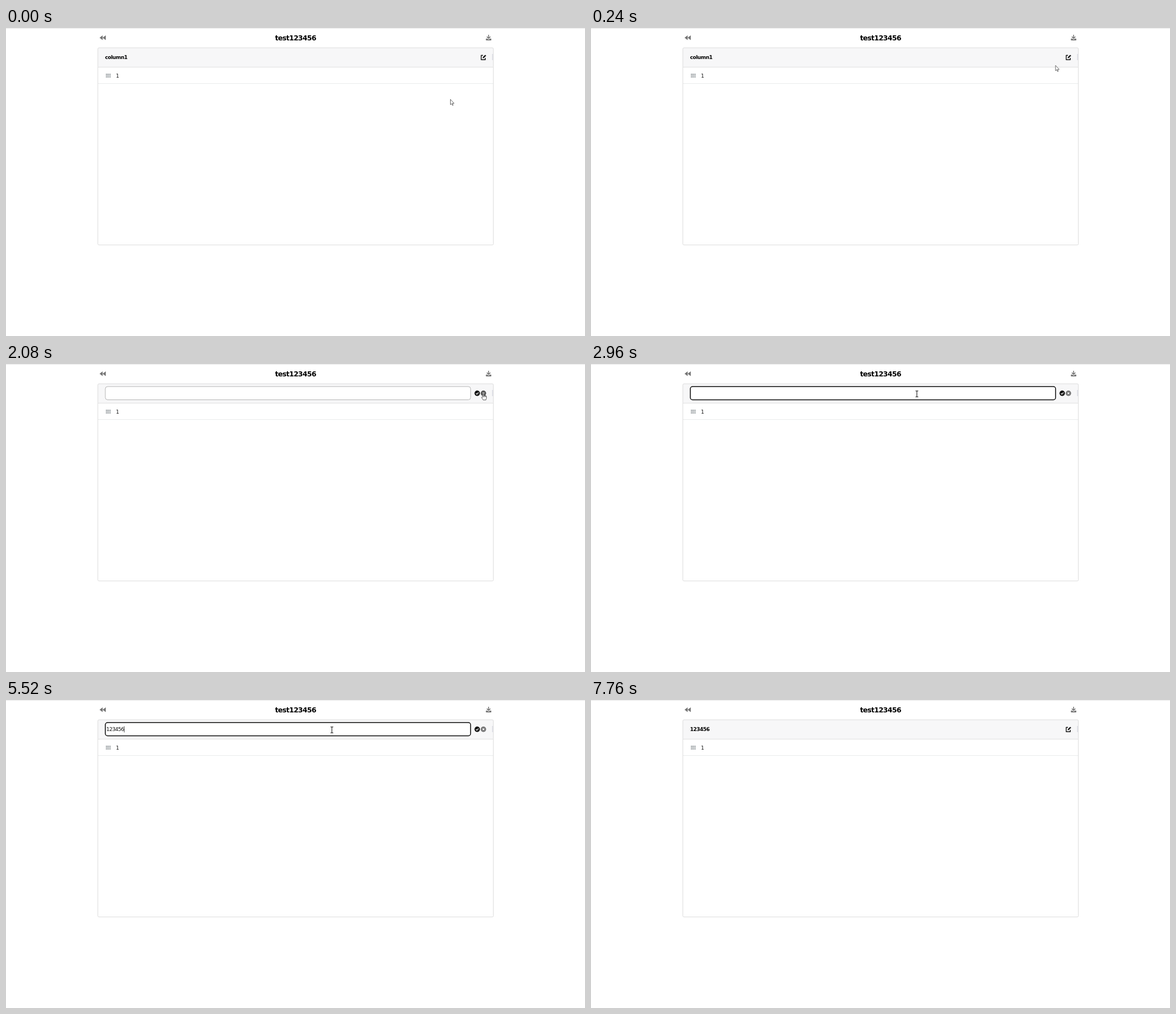
Write an HTML page that moves like this. It is 1026 px wide and 546 px high and loops after 8.32 s.

```html
<!DOCTYPE html>
<html lang="en">
<head>
<meta charset="utf-8">
<title>Rename a column</title>
<style>
  html, body { margin: 0; width: 100%; height: 100%; overflow: hidden; background: #fff; }
  svg { display: block; width: 1026px; height: 546px; }
  text { font: 9.2px "DejaVu Sans", Verdana, sans-serif; letter-spacing: -.068em; fill: #111; }
  .bold { font-weight: bold; font-size: 9px; letter-spacing: -.055em; fill: #000; }
  #title { font-size: 12.4px; }
</style>
</head>
<body>
<svg viewBox="0 0 1026 546">
  <path d="M0 .5H1026" stroke="#e8e8e8"/>

  <path d="M171.3 13V21.6L165.8 17.3ZM176.8 13V21.6L171.3 17.3Z" fill="#757575"/>
  <text id="title" class="bold" x="476.8" y="21.8">test123456</text>
  <g stroke="#757575" fill="none">
    <path d="M855.2 12V18M852.1 15.4L855.2 18.5L858.3 15.4" stroke-width="1.5"/>
    <path d="M850.9 19.2H852.6L855.2 21L857.8 19.2H859.5V21.5H850.9Z" fill="#757575" stroke-linejoin="round"/>
  </g>

  <rect x="163" y="35" width="700" height="34" rx="2" fill="#f7f7f8"/>
  <rect id="row" x="163" y="70" width="700" height="28" fill="#e6f2fe"/>
  <path d="M163 69.3H863" stroke="#dedede"/>
  <path d="M163 98.4H863" stroke="#e8eaea"/>
  <rect x="861.3" y="46" width="1.7" height="11" fill="#dedfe6"/>
  <rect x="162.8" y="35.1" width="700.8" height="349.5" rx="2" fill="none" stroke="#dcdcdc"/>
  <path d="M177 82H185.5M177 84.4H185.5M177 86.8H185.5" stroke="#6b7478" stroke-width="1.4" stroke-dasharray="1.5 .8"/>
  <text x="194.8" y="88" fill="#17262c">1</text>

  <g id="view">
    <text id="name" class="bold" x="175.5" y="55.2"></text>
    <path d="M845.3 48.5H842.1V56.2H849.3V53" fill="none" stroke="#111" stroke-width="1.4" stroke-linejoin="round"/>
    <path d="M845.1 53.3L845.6 51.5L849.2 47.9L850.4 49.1L846.8 52.7Z" fill="#111" stroke="#111" stroke-width=".9" stroke-linejoin="round"/>
  </g>

  <g id="edit">
    <rect id="field" x="176" y="40" width="647.3" height="23.4" rx="4" fill="#fff"/>
    <text id="typed" x="177.7" y="55.2"></text>
    <rect id="caret" y="46.5" width=".8" height="11" fill="#333"/>
    <circle id="ok" cx="835" cy="51.9" r="4.8"/>
    <path id="tick" d="M832.8 52L834.4 53.6L837.3 50.5" fill="none" stroke-width="1.1"/>
    <circle id="cancel" cx="846" cy="51.9" r="4.8"/>
    <path d="M844.5 50.4L847.5 53.4M847.5 50.4L844.5 53.4" stroke="#fff" stroke-width="1.1"/>
  </g>

  <g id="pointer" stroke-width=".8" stroke-linejoin="round">
    <path id="arrow" d="M.5 .5V10L2.7 8L4.1 11.3L5.5 10.7L4.1 7.5H7Z" fill="#fff" stroke="#444"/>
    <path id="beam" d="M-2.5 -5.2H2.5M0 -5V5M-2.5 5.2H2.5" stroke="#111" stroke-width="1"/>
    <path id="hand" d="M-1 8V1.2Q-.2 -.2 .7 1.2V4.7L4 5.2Q5.4 5.4 5.4 7V9.4L4.3 12.8H-.4L-3.4 8.2Q-3 6.3 -1 8ZM.7 4.7V7.5M2.4 5V7.5M4 5.2V7.5" fill="#fff" stroke="#333"/>
  </g>
</svg>
<script>
const LOOP = 8320, STEP = 80;
const OPEN = 1840, HOVER = 2080, FOCUS = 2430, BLUR = 7040, SAVE = 7200;
const BLINK = 530;
const VALUE = "123456", TYPE_START = 3920, TYPE_GAP = 256, DIGIT = 5.2;

// Pointer trips; powX and powY set how strongly each axis eases out.
const HOME = { x: 787, y: 126 };
const MOVES = [
  { from: 0, to: 640, x: 845.5, y: 55, powY: 4 },
  { from: 720, to: 880, x: 847, y: 53 },
  { from: 1440, to: 1600, x: 846, y: 51 },
  { from: 2160, to: 2640, x: 577.5, y: 53 },
  { from: 5600, to: 6800, x: 833.5, y: 53.5, lift: 7 },
  { from: 7440, to: 7760, x: 575, y: -16, powX: 1, powY: 1 }
];

const el = {};
document.querySelectorAll("[id]").forEach(node => el[node.id] = node);

const show = (node, on) => node.setAttribute("visibility", on ? "inherit" : "hidden");
const set = (node, attrs) => {
  for (const key in attrs) node.setAttribute(key, attrs[key]);
};
const clamp = (v, low, high) => Math.min(high, Math.max(low, v));
const easeOut = (k, power) => 1 - (1 - k) ** power;

function pointerAt(t) {
  let { x, y } = HOME;
  for (const m of MOVES) {
    const k = clamp((t - m.from) / (m.to - m.from), 0, 1);
    x += (m.x - x) * easeOut(k, m.powX ?? 2);
    y += (m.y - y) * easeOut(k, m.powY ?? 2) - (m.lift ?? 0) * Math.sin(Math.PI * k);
  }
  return { x, y };
}

function pointerShape(t, x) {
  if (t < HOVER || t >= SAVE) return "arrow";
  if (x > 829) return "hand";
  return x > 823 ? "arrow" : "beam";
}

function caretOn(t, count) {
  const since = count ? TYPE_START + (count - 1) * TYPE_GAP : FOCUS;
  return Math.floor((t - since) / BLINK) % 2 === 0;
}

function render(time) {
  const t = Math.floor(time / STEP) * STEP;
  const { x, y } = pointerAt(t);
  const editing = t >= OPEN && t < SAVE;
  const focused = t >= FOCUS && t < BLUR;
  const count = clamp(Math.floor((t - TYPE_START) / TYPE_GAP) + 1, 0, VALUE.length);
  const shape = pointerShape(t, x);
  const hovering = shape === "hand";
  const overOk = hovering && x < 840;

  show(el.row, y > 70 && y < 98);
  show(el.view, !editing);
  show(el.edit, editing);
  el.name.textContent = t < OPEN ? "column1" : VALUE;
  el.typed.textContent = VALUE.slice(0, count);

  set(el.field, { stroke: focused ? "#0a0a0a" : "#b5b5b5", "stroke-width": focused ? 1.5 : 1 });
  set(el.caret, { x: 178 + count * DIGIT });
  show(el.caret, editing && focused && caretOn(t, count));
  set(el.ok, { fill: overOk ? "#f5b942" : "#111" });
  set(el.tick, { stroke: overOk ? "#b98a2c" : "#fff" });
  set(el.cancel, { fill: hovering ? "#555" : "#777" });

  for (const kind of ["arrow", "beam", "hand"]) show(el[kind], kind === shape);
  set(el.pointer, { transform: `translate(${x} ${y})` });
}

const start = performance.now();
function tick() {
  render((performance.now() - start) % LOOP);
  requestAnimationFrame(tick);
}
tick();
</script>
</body>
</html>
```
